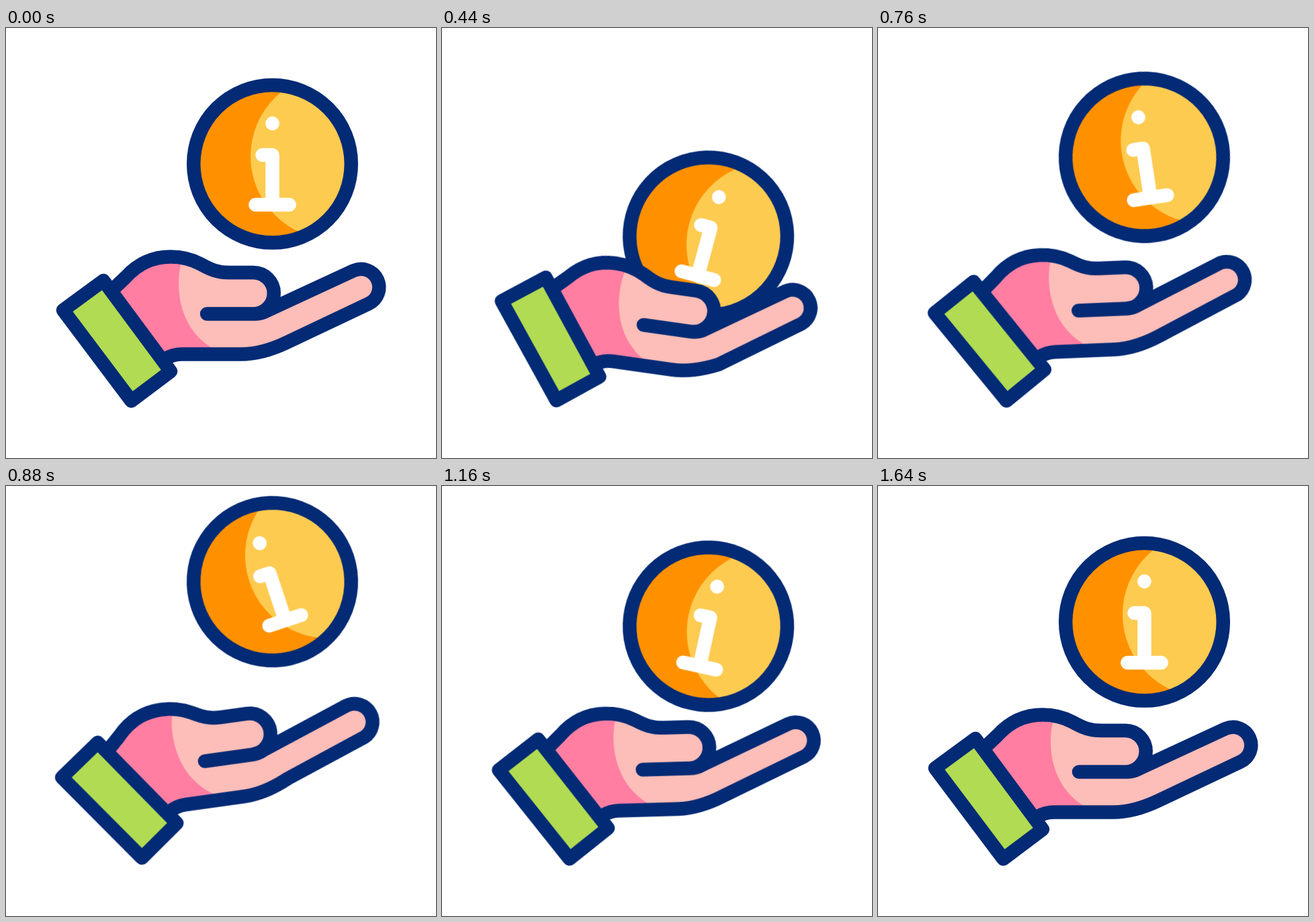
Animation, 640 px wide and 640 px high, one loop 2000 ms. Source, as an HTML page without scripts:

```html
<!DOCTYPE html>
<html lang="en">
<head>
<meta charset="utf-8">
<title>Information in hand</title>
<style>
  html, body { margin: 0; width: 100%; height: 100%; overflow: hidden; background: #fff; }
  svg { display: block; width: 100%; height: 100%; }

  .line { fill: none; stroke: #032a75; stroke-width: 20.5; stroke-linecap: round; stroke-linejoin: round; }
  .sign { fill: none; stroke: #fff; stroke-width: 20.5; stroke-linecap: round; stroke-linejoin: round; }
  .skin { fill: #fdbdb8; }

  .coin, .hand, .palm { animation: 2s ease infinite; }
  .coin { transform-origin: 396.5px 202.3px; animation-name: toss; }
  .hand { transform-origin: 183px 440px; animation-name: swing; }
  .palm { animation-name: bend; }

  @keyframes toss {
    0%, 6.5% { transform: translateY(0) rotate(0); }
    33.5% { transform: translateY(124px) rotate(17.3deg); }
    44% { transform: translateY(-60px) rotate(-18.3deg); }
    64% { transform: translateY(10.5px) rotate(14.3deg); }
    82%, 100% { transform: translateY(0) rotate(0); }
  }
  @keyframes swing {
    0%, 6.5% { transform: rotate(0); }
    33.5% { transform: rotate(9.3deg); }
    45% { transform: rotate(-8deg); animation-timing-function: ease-in-out; }
    64%, 100% { transform: rotate(0); }
  }
  /* Only the thumb's reach and the two ends of the fingertip arc move. */
  @keyframes bend {
    0%, 6.5%, 64%, 100% {
      d: path("M158 390L178 371C196 351 218 340.5 245 340.5C264 340.5 278 345 290 351.5C305 360 316 364 332 364H368A30.7 30.7 0 0 1 368 425.5H299H370C377 425.5 382 424 387 421.5L517 361.3A27 27 0 0 1 539.6 410.4L418 468C397 478 374 485.5 350 485.5H262C250 485.5 243 489 238 492");
    }
    33.5% {
      d: path("M158 390L178 371C196 351 218 340.5 245 340.5C264 340.5 278 345 290 351.5C305 360 316 364 332 364H370A30.7 30.7 0 0 1 370 425.5H299H370C377 425.5 382 424 387 421.5L499 343.8A27 27 0 0 1 530.3 387.8L418 468C397 478 374 485.5 350 485.5H262C250 485.5 243 489 238 492");
    }
    45% {
      d: path("M158 390L178 371C196 351 218 340.5 245 340.5C264 340.5 278 345 290 351.5C305 360 316 364 332 364H371A30.7 30.7 0 0 1 371 425.5H299H370C377 425.5 382 424 387 421.5L520 372.6A27 27 0 0 1 539 423L418 468C397 478 374 485.5 350 485.5H262C250 485.5 243 489 238 492");
      animation-timing-function: ease-in-out;
    }
  }
</style>
</head>
<body>
<svg viewBox="0 0 640 640">
  <clipPath id="face"><circle cx="396.5" cy="202.3" r="117"/></clipPath>

  <g class="coin">
    <circle cx="396.5" cy="202.3" r="117" fill="#ff9100"/>
    <circle cx="487.5" cy="191" r="123.5" fill="#fdcb50" clip-path="url(#face)"/>
    <circle class="line" cx="396.5" cy="202.3" r="117.3"/>
    <circle cx="396.5" cy="142" r="10.4" fill="#fff"/>
    <path class="sign" d="M381.5 189H396.5V263M371.3 263H421.7"/>
  </g>

  <g class="hand">
    <path class="palm skin"/>
    <path fill="#ff7ea2" d="M158 390L178 371C196 351 218 340.5 245 340.5L263 342L260 352C252 388 258 446 306 476L318 485.5H262L238 492Z"/>
    <path class="palm line"/>
    <path class="line" style="fill:#b1db52" d="M145 376L85 420L186.5 555L245 511Z"/>
  </g>
</svg>
</body>
</html>
```
